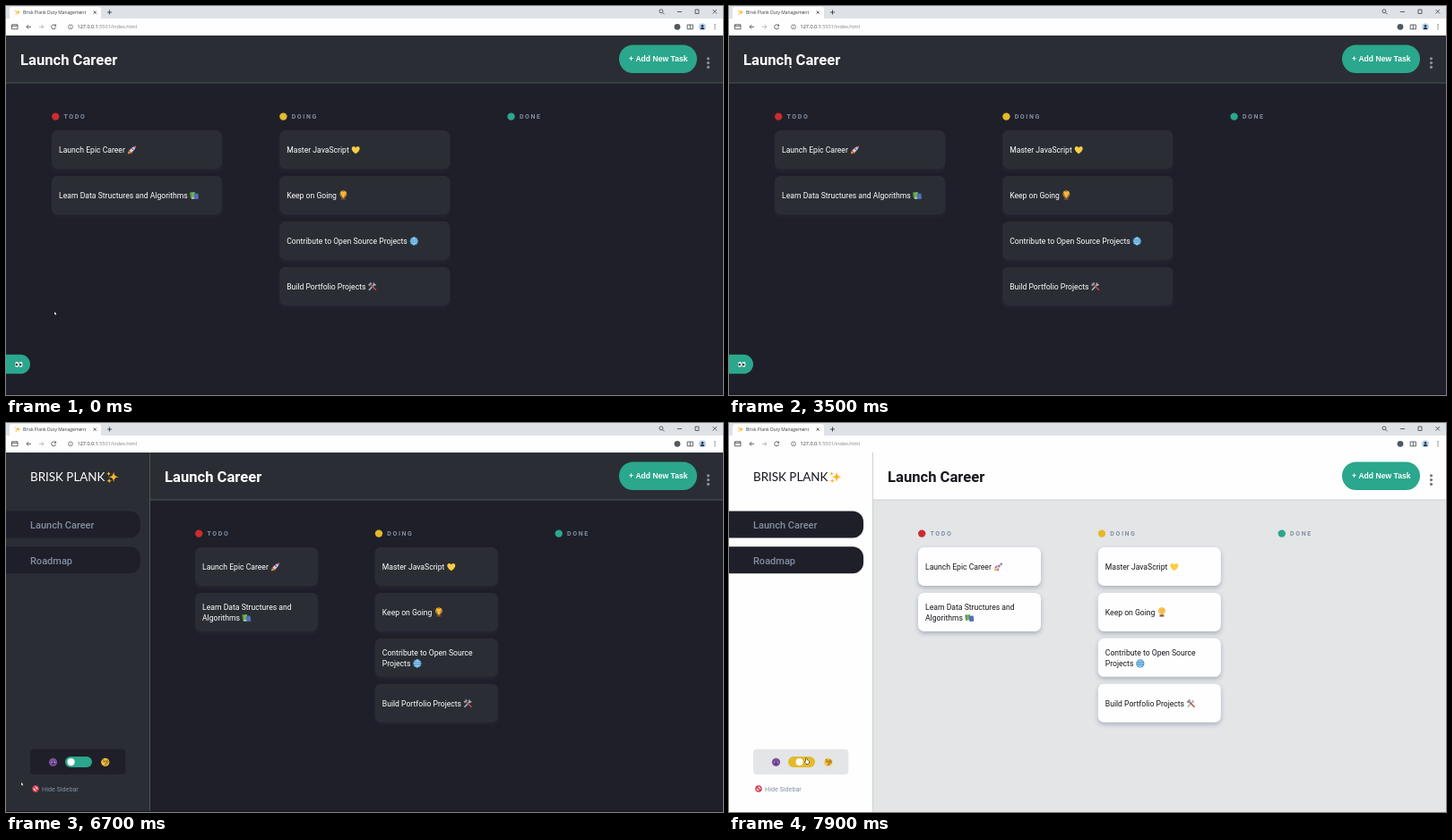
These frames come from a looping animation (800 by 435 pixels, 8000 ms). An HTML page with a canvas:

```html
<!DOCTYPE html>
<html lang="en">
<head>
<meta charset="utf-8">
<title>Task board</title>
<style>
  html, body { margin: 0; width: 100%; height: 100%; overflow: hidden; background: #1f1f29; }
  canvas { display: block; width: 800px; height: 435px; }
</style>
</head>
<body>
<canvas id="stage"></canvas>
<script>
const W = 800, H = 435, LOOP = 8000, STEP = 100;
const canvas = document.getElementById('stage');
const ctx = canvas.getContext('2d');
const dpr = window.devicePixelRatio || 1;
canvas.width = W * dpr;
canvas.height = H * dpr;

const SANS = 'Roboto, sans-serif';
const GREEN = '#2aa78c', YELLOW = '#e5b92a', RED = '#cb2d2f', MUTED = '#828fa3';
const DARK = { bg: '#1f1f29', panel: '#2a2e34', line: '#4c5754', text: '#fff', well: '#1f1f29',
               track: GREEN, shadow: 'rgba(54,60,80,.25)', menu: '#8a9197' };
const LIGHT = { bg: '#e3e5e7', panel: '#fefefe', line: '#cdd1d4', text: '#16161c', well: '#e3e5e7',
                track: YELLOW, shadow: 'rgba(54,70,100,.32)', menu: '#737a80' };

const columns = [
  { name: 'TODO', color: RED, cards: [['Launch Epic Career', rocket], ['Learn Data Structures and|Algorithms', books]] },
  { name: 'DOING', color: YELLOW, cards: [['Master JavaScript', heart], ['Keep on Going', trophy],
      ['Contribute to Open Source|Projects', globe], ['Build Portfolio Projects', tools]] },
  { name: 'DONE', color: GREEN, cards: [] }
];

// time, x, y
const pointerPath = [
  [0, 55, 343], [2700, 55, 343], [2800, 108, 70], [3100, 122, 66], [3400, 62, 69], [3700, 88, 62],
  [4000, 88, 62], [4300, 87, 46], [4600, 87, 46], [4900, 140, 158], [5100, 140, 158],
  [5300, 154, 174], [5500, 157, 178], [5900, 157, 178], [6100, 118, 240], [6400, 22, 394],
  [6600, 16, 402], [6800, 20, 404], [7100, 25, 401], [7400, 55, 388], [7700, 87, 378], [8000, 87, 378]
];

function pointerAt(t) {
  const i = pointerPath.findIndex(p => p[0] > t);
  const [t0, x0, y0] = pointerPath[i - 1], [t1, x1, y1] = pointerPath[i];
  const k = (t - t0) / (t1 - t0), e = k * k * (3 - 2 * k);
  return [x0 + (x1 - x0) * e, y0 + (y1 - y0) * e];
}

function box(x, y, w, h, r, color) {
  ctx.fillStyle = color;
  ctx.beginPath();
  ctx.roundRect(x, y, w, h, r);
  ctx.fill();
}
function dot(x, y, r, color) {
  ctx.fillStyle = color;
  ctx.beginPath();
  ctx.arc(x, y, r, 0, 7);
  ctx.fill();
}
function ring(x, y, r, color, width = .8) {
  ctx.strokeStyle = color;
  ctx.lineWidth = width;
  ctx.beginPath();
  ctx.arc(x, y, r, 0, 7);
  ctx.stroke();
}
function line(d, color, width = .8) {
  ctx.strokeStyle = color;
  ctx.lineWidth = width;
  ctx.stroke(new Path2D(d));
}
function shape(d, color) {
  ctx.fillStyle = color;
  ctx.fill(new Path2D(d));
}
function text(s, x, y, font, color, spacing = 0) {
  ctx.font = font;
  ctx.fillStyle = color;
  ctx.letterSpacing = spacing + 'px';
  ctx.fillText(s, x, y);
  const width = ctx.measureText(s).width;
  ctx.letterSpacing = '0px';
  return width;
}
function at(x, y, draw, scale = 1) {
  ctx.save();
  ctx.translate(x, y);
  ctx.scale(scale, scale);
  draw();
  ctx.restore();
}

// Small pictograms, about 10px, centred on the origin
function rocket() {
  shape('M-4.5 4.5L-3.5 1L-1 3.5Z', '#f2a32c');
  shape('M-4 .5L-1-2L1 3L-1 4.5L-1.5 2Z', '#d5294a');
  shape('M4.6-4.6Q1-4.3-2.8 1L-.8 3Q4.3-.8 4.6-4.6Z', '#c9d3de');
  shape('M4.6-4.6L2-3.8L3.8-2Z', '#d5294a');
  dot(1, -1.2, 1, '#4a7fa8');
}
function books() {
  at(0, 0, () => {
    ctx.rotate(-.1);
    box(-4.6, -4, 5.5, 6.5, .5, '#77b255');
    box(-4.6, -4, 1.2, 6.5, .3, '#4b8a35');
    box(-.6, -2.2, 5, 6.3, .5, '#3b76bd');
    box(1, -.5, 2.5, 3, .2, '#8d5aa5');
    box(-3.6, 2.2, 3.2, 1.2, 0, '#e5e8ec');
  });
}
function heart() {
  shape('M0 4.2C-6.5 0-4.7-4-2.3-4C-.8-4 0-2.4 0-2.4S.8-4 2.3-4C4.7-4 6.5 0 0 4.2Z', '#fdcb45');
}
function trophy() {
  ring(0, -1.8, 3.5, '#e8a52b', 1);
  shape('M-2.8-4.5H2.8Q2.8 0 .8 1V3H-.8V1Q-2.8 0-2.8-4.5Z', '#fbb938');
  box(-2.5, 2.6, 5, 2, .3, '#80512f');
}
function globe() {
  dot(0, 0, 4.6, '#3c92cc');
  line('M-4.5 0H4.5M0-4.5V4.5M-3.7-2.5H3.7M-3.7 2.5H3.7M0-4.5Q-4.5 0 0 4.5Q4.5 0 0-4.5', '#b9e0f5', .6);
}
function tools() {
  line('M-4 4L2.5-2.8', '#a9b8c2', 1.6);
  line('M4 4L-2.5-2.5', '#c24a48', 1.6);
  line('M-4.2-1.2L-1.2-4.2', '#8797a3', 2.2);
  line('M1.5-4.2V-2H3.8', '#a9b8c2', 1.4);
}
function sparkles() {
  const star = (x, y, r) => shape(`M${x} ${y - r}Q${x} ${y} ${x + r} ${y}Q${x} ${y} ${x} ${y + r}` +
    `Q${x} ${y} ${x - r} ${y}Q${x} ${y} ${x} ${y - r}`, '#fdb52c');
  star(1, 0, 5.5);
  star(1, 0, 4.6);
  dot(1, 0, 1.5, '#fdb52c');
  star(-4, -3.2, 2.8);
  star(-3.5, 4, 2.8);
}
function eyes() {
  for (const x of [-2.2, 2.2]) {
    box(x - 1.9, -3, 3.8, 6, 2, '#f4f7f8');
    dot(x - .3, .2, 1.2, '#22262b');
  }
}
function darkFace() {
  dot(0, 0, 4.6, '#7d4fa3');
  line('M-3-.9H-.8M.8-.9H3M-1.5 2Q0 1 1.5 2', '#2b1738', 1);
  dot(-1.8, -.3, .7, '#d9c7e6');
  dot(1.8, -.3, .7, '#d9c7e6');
}
function monocleFace() {
  dot(0, 0, 4.6, '#fcc23c');
  ring(1.7, -.6, 1.8, '#6b5325', .7);
  dot(-1.7, -.6, .7, '#5c4018');
  dot(1.7, -.6, .7, '#5c4018');
  line('M-3-2.6L-1-2.2M-1 2.6H1.5', '#5c4018', .8);
}
function noEntry() {
  dot(0, 0, 3.4, '#e8d9da');
  ring(0, 0, 3.1, '#d92c45', 1.3);
  line('M-2.2-2.2L2.2 2.2', '#d92c45', 1.3);
}
function person() {
  dot(0, 0, 4, '#b9d3ee');
  dot(0, -1, 1.4, '#25364a');
  box(-2.3, .8, 4.6, 2, [2, 2, .5, .5], '#25364a');
}

function arrow() {
  const d = 'M0 0V4.6L1.1 3.6L1.9 5.2L2.7 4.8L2 3.3H3.4Z';
  line(d, '#111', .9);
  shape(d, '#fff');
}
function hand() {
  const d = 'M-1.3-3Q-.5-3.6-.2-2.6V-.9L1.9-.4Q2.4 0 2.2 1L1.6 3H-1L-2.6.8Q-2.2 0-1.3.8Z';
  line(d, '#111', 1);
  shape(d, '#fff');
}

function browserBar() {
  const ink = '#3c4046', label = '#33373d', font = '"Open Sans", sans-serif';
  box(0, 0, W, 15, 0, '#dee1e6');
  box(4, 1, 102, 14, [3, 3, 0, 0], '#fefefe');
  box(0, 14, W, 19, 0, '#fefefe');
  at(13, 7, sparkles, .5);
  text('Brisk Plank Duty Management', 19, 9.2, '5px ' + font, label);
  line('M97.7 5.7l3 3m0-3l-3 3M113 7h5m-2.5-2.5v5', ink, .9);
  ring(731, 5.8, 2, ink);
  line('M732.5 7.3l2 2M749 6.5h5M788.5 4l4.5 4.5m0-4.5l-4.5 4.5M769 4h4v4.4h-4z', ink);
  line('M6.5 20.8h6.5v5H6.5zM6.5 22.3h6.5M28 23.3h-5m2.3-2.3l-2.3 2.3l2.3 2.3', ink);
  line('M37 23.3h5m-2.3-2.3l2.3 2.3l-2.3 2.3', '#a5a9ae');
  line('M55.2 21.8A2.5 2.5 0 1 0 55.6 24M55.6 20.5v1.8h-1.8', ink);
  ring(72, 23.3, 2.5, '#5b6066', .7);
  line('M72 22.8v1.8M72 21.5v.7', '#5b6066', .7);
  const host = text('127.0.0.1', 79.5, 25.4, '5.5px ' + font, label);
  text(':5501/index.html', 79.5 + host, 25.4, '5.5px ' + font, '#7b8087');
  dot(749, 23.3, 3.4, '#53585e');
  line('M760.2 21h6.2v4.8h-6.2zM763.3 21v4.8', ink);
  at(777, 23.3, person);
  for (const y of [21, 23.3, 25.6]) dot(791, y, .65, ink);
}

function header(theme, x) {
  box(x, 33, W - x, 53, 0, theme.panel);
  box(x, 85.5, W - x, 1, 0, theme.line);
  text('Launch Career', x + 16, 66, 'bold 16.6px ' + SANS, theme.text);
  box(684, 43.5, 87, 31.5, 15.7, GREEN);
  text('+ Add New Task', 695, 62.2, 'bold 8.6px "Liberation Sans", Arial, sans-serif', '#fff');
  for (const y of [58.8, 63.6, 68.4]) dot(783.5, y, 1.6, theme.menu);
}

function card(theme, x, y, width, [label, icon], wrap) {
  ctx.save();
  ctx.shadowColor = theme.shadow;
  ctx.shadowBlur = 5 * dpr;
  ctx.shadowOffsetY = 2.5 * dpr;
  box(x, y, width, 43, 6.5, theme.panel);
  ctx.restore();
  const lines = wrap ? label.split('|') : [label.replace('|', ' ')];
  const first = y + 25.1 - (lines.length - 1) * 6;
  lines.forEach((s, i) => {
    const w = text(s, x + 8, first + i * 12, '8.62px ' + SANS, theme.text);
    if (i === lines.length - 1) at(x + 15.5 + w, first + i * 12 - 3, icon);
  });
}

function board(theme, open) {
  const left = open ? 211 : 51, pitch = open ? 200.8 : 254.2, width = open ? 137 : 190;
  columns.forEach((col, c) => {
    const x = left + c * pitch;
    dot(x + 4.2, 123.6, 4.2, col.color);
    text(col.name, x + 13.5, 126.2, 'bold 7px ' + SANS, MUTED, 1.6);
    col.cards.forEach((item, i) => card(theme, x, 139 + i * 50.9, width, item, open));
  });
}

function sidebar(theme, pressed) {
  const light = theme === LIGHT;
  box(0, 33, 160, H - 33, 0, theme.panel);
  box(160, 33, 1, H - 33, 0, theme.line);
  text('BRISK PLANK', 27, 65, '13.4px Lato, sans-serif', theme.text);
  at(119, 60.3, sparkles, 1.1);
  ['Launch Career', 'Roadmap'].forEach((name, i) => {
    box(0, 98.6 + i * 39.7, 150, 30, [0, 12, 12, 0], DARK.well);
    text(name, 27, 117.9 + i * 39.7, '500 11px ' + SANS, MUTED);
  });
  box(27, 364.8, 106.3, 28.2, 4, theme.well);
  at(52.5, 379.3, darkFace);
  at(110.8, 379.3, monocleFace);
  box(66, 373, 30, 12, 6, theme.track);
  const knob = light ? 74.5 : 68.5;
  box(knob, 375, pressed ? 10 : 8.2, 8.2, 4.1, '#fff');
  at(33, 409, noEntry);
  text('Hide Sidebar', 40, 411.6, '7.2px ' + SANS, MUTED);
}

function render(t) {
  const open = t >= 6600, light = t >= 7900, theme = light ? LIGHT : DARK;
  ctx.setTransform(dpr, 0, 0, dpr, 0, 0);
  box(0, 0, W, H, 0, theme.bg);
  header(theme, open ? 161 : 0);
  board(theme, open);
  if (open) {
    sidebar(theme, t >= 7800 && !light);
  } else {
    box(0, 389.8, 27, 21.5, [0, 10.7, 10.7, 0], GREEN);
    at(14.3, 400.8, eyes);
  }
  if (!light) box(0, 434, W, 1, 0, '#15151c');
  browserBar();
  const [x, y] = pointerAt(t);
  const onCard = x > 51 && x < 241 && y > 139 && y < 233 && !(y > 182 && y < 190);
  const onEyes = !open && x < 27 && y > 390;
  const onToggle = open && x > 66 && y < 385;
  if (onCard || onEyes || onToggle) at(x, y, hand);
  else at(x - 1, y - 1, arrow, .7);
}

const start = performance.now();
function tick() {
  const t = (performance.now() - start) % LOOP;
  render(Math.floor(t / STEP) * STEP);
  requestAnimationFrame(tick);
}
tick();
</script>
</body>
</html>
```
